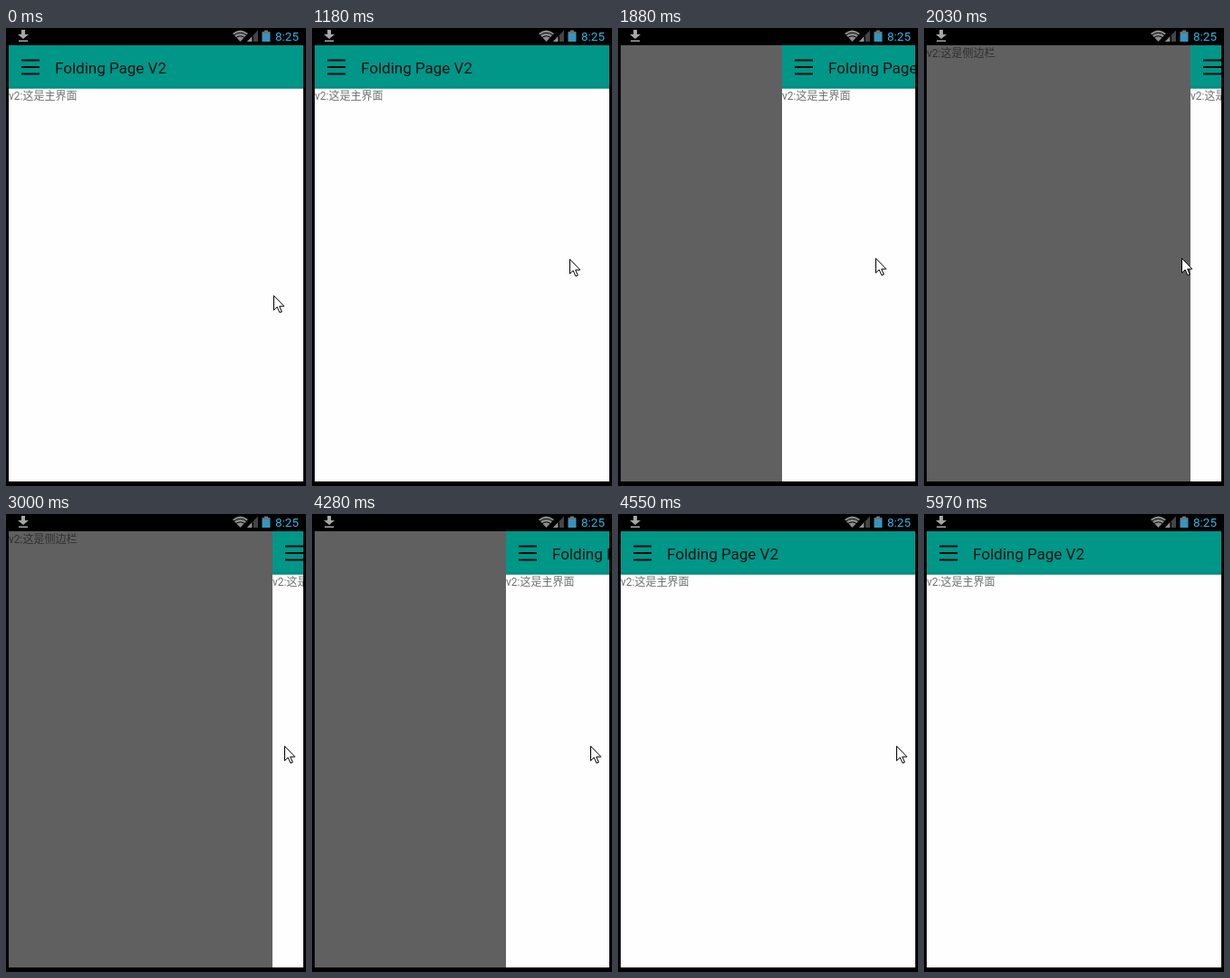
An HTML page for the animation above (6.53 s loop, 331 by 504 pixels).

```html
<!DOCTYPE html>
<html lang="zh">
<meta charset="utf-8">
<title>Sliding drawer</title>
<style>
  html, body { margin: 0; width: 100%; height: 100%; overflow: hidden; background: #000; }
  svg { display: block; width: 331px; height: 504px; }
  text { font: 12px Roboto, "Noto Sans CJK SC", "Noto Sans CJK", sans-serif; }
  .title { font-size: 17px; }
  .clock { font-size: 13.5px; fill: #33b5e5; }
</style>
<svg viewBox="0 0 331 504">
  <clipPath id="screen"><path d="M3 19H328V499H3Z"/></clipPath>

  <!-- status bar -->
  <path d="M17 2h4v5h4l-6 5-6-5h4zM14 13.5h10V15H14z" fill="#a6a6a6"/>
  <path d="M250 6Q258.500-1 267 6L258.500 15Z" fill="#8c8c8c"/>
  <path d="M251 8.200Q258.500 2.500 266 8.200M253.500 10.700Q258.500 7 263.500 10.700" fill="none" stroke="#000"/>
  <path d="M266 15 278 2.500V15Z" fill="#444"/>
  <path d="M266 15 271 9.800V15Z" fill="#909090"/>
  <path d="M272.500 9V15" stroke="#000"/>
  <path d="M285 2.500h4V4h2.500v2h-9V4H285z" fill="#6c7478"/>
  <path d="M282.500 6h9v9h-9z" fill="#3795bd"/>
  <text class="clock" x="297" y="14">8:25</text>

  <g clip-path="url(#screen)">
    <path d="M3 19H328V499H3Z" fill="#606060"/>
    <text id="drawer" x="3" y="32" fill="#303030">v2:这是侧边栏</text>
    <g id="page">
      <path d="M3 66H328V499H3Z" fill="#fefefe"/>
      <path d="M3 19H328V66.500H3Z" fill="#009688"/>
      <path d="M3 65.500H328" stroke="#028b7e" stroke-width="2"/>
      <path d="M17 35.500h20M17 43h20M17 50.500h20" stroke="#0a0a0a" stroke-width="2"/>
      <text class="title" x="54" y="50" fill="#0c1413">Folding Page V2</text>
      <text x="3" y="79" fill="#707070">v2:这是主界面</text>
    </g>
  </g>
  <path id="cursor" d="M.5.500V16.500L4.200 13 7 19.200 9.300 18.200 6.700 12.200H11.800Z" fill="#fff" stroke="#000"/>
</svg>
<script>
  const LOOP = 6530, OPEN = 291;
  // [start ms, drawer offset]
  const slides = [[0, 0], [1760, 57], [1880, 178], [2030, OPEN], [4280, 211], [4400, 96], [4550, 0]];
  // [start ms, x, y]; the pointer finally leaves the stage
  const pointer = [
    [0, 295, 294], [940, 292, 284], [1060, 287, 265], [1180, 284, 254], [1330, 284, 253],
    [2430, 292, 253], [2580, 300, 254], [2700, 305, 255], [2850, 306, 255], [3000, 307, 255],
    [5550, 312, 310], [5670, 318, 401], [5820, 321, 455], [5970, 340, 510]
  ];
  const [drawer, page, cursor] = ["drawer", "page", "cursor"].map(id => document.getElementById(id));
  const at = (steps, t) => steps.findLast(step => step[0] <= t);
  const move = (node, x, y = 0) => node.setAttribute("transform", `translate(${x} ${y})`);

  function draw() {
    const t = performance.now() % LOOP;
    const [, offset] = at(slides, t);
    const [, x, y] = at(pointer, t);
    move(page, offset);
    move(drawer, offset - OPEN);
    move(cursor, x, y);
    requestAnimationFrame(draw);
  }
  draw();
</script>
</html>
```
